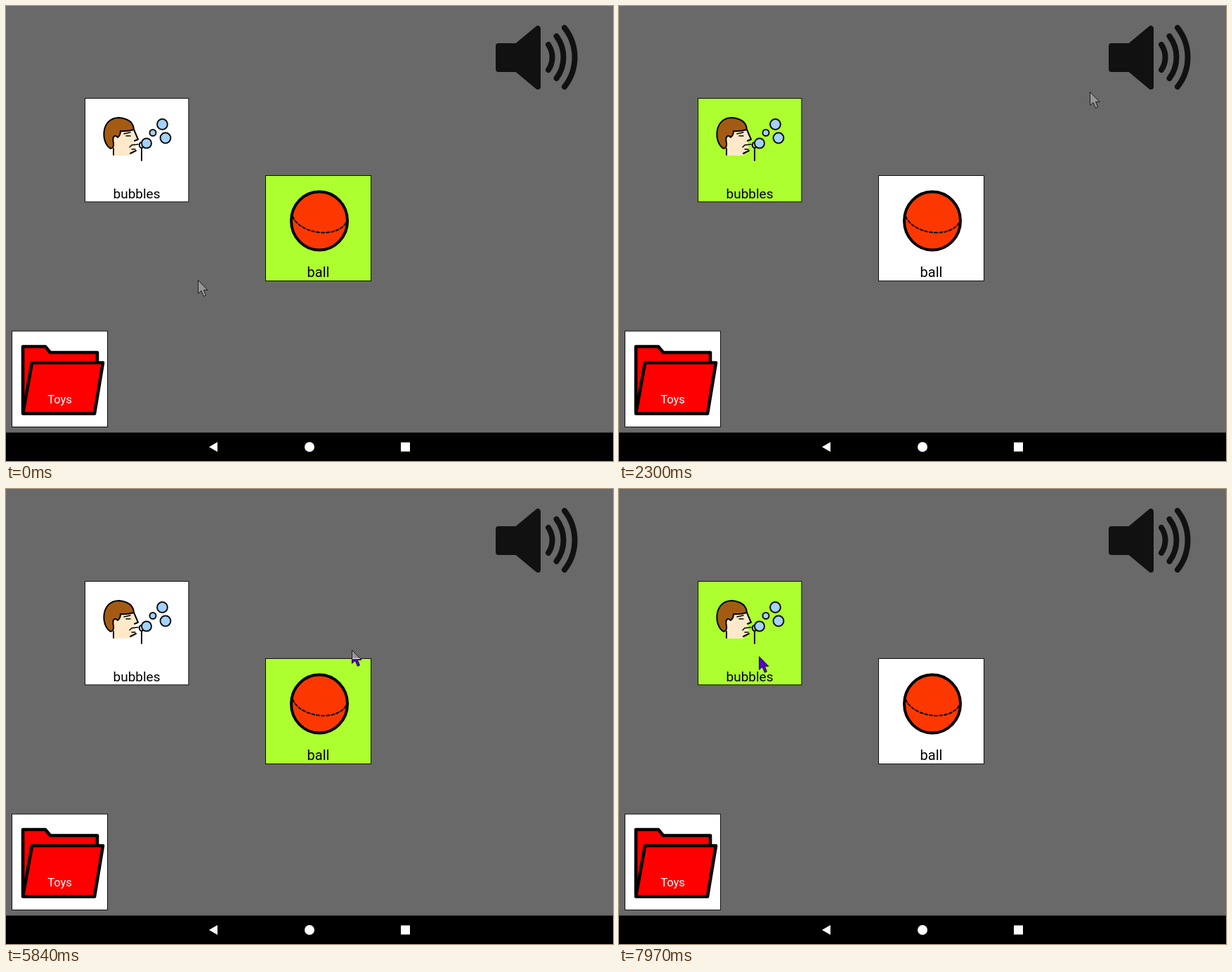
Animation of 864 by 648 pixels, one loop 8 s. Source, as an HTML page:

```html
<!DOCTYPE html>
<html lang="en">
<head>
<meta charset="utf-8">
<title>Toy board</title>
<style>
  html, body { margin: 0; width: 100%; height: 100%; overflow: hidden; background: #696969; }
  svg { display: block; width: 864px; height: 648px; }
  text { font-family: Roboto, Arial, sans-serif; text-anchor: middle; }
  .card { fill: #fff; stroke: #111; stroke-width: 1; }
  .line { fill: none; stroke: #000; stroke-width: 2; stroke-linecap: round; stroke-linejoin: round; }
  .invert { fill: #fff; mix-blend-mode: difference; }
  .edge { fill: none; stroke: #000; stroke-opacity: .75; }
</style>
</head>
<body>
<svg viewBox="0 0 864 648">
  <defs><path id="arrow" d="M.5 .5V19.5L5 15.5L8.5 23.5L11.5 22L8.5 14.5H14Z"/></defs>

  <g fill="#111" stroke="#111" stroke-width="8" stroke-linejoin="round" stroke-linecap="round">
    <path d="M701 57H727L757 32V115L727 90H701Z"/>
    <g id="waves" fill="none"></g>
  </g>

  <g id="bubbles">
    <rect class="card" x="112.5" y="131.5" width="147.4" height="147.4"/>
    <path fill="#ffe9c8" d="M153 180L182 175L188 190L183 193L185 206L177 211V213H152Z"/>
    <path class="line" d="M182 176L188 190L183 192M185 206L177 210M153 203V212"/>
    <path class="line" style="fill:#a35b14"
      d="M149 203C135 196 134 159 161 159Q181 161 182 176Q172 179 163 178Q163 184 159 187C154 182 151 187 153 195Q154 202 149 203Z"/>
    <path class="line" style="stroke-width:1.5" d="M168 182L177 180M171 185H177M176 201L179 198L188 197M179 204H184"/>
    <path class="line" d="M193 202V220"/>
    <ellipse class="line" cx="193" cy="198" rx="3.2" ry="4"/>
    <text x="186" y="273.5" font-size="19">bubbles</text>
  </g>

  <g id="ball">
    <rect class="card" x="369.5" y="241.5" width="150" height="150"/>
    <ellipse cx="446" cy="306" rx="40" ry="41.5" fill="#fc3800" stroke="#000" stroke-width="4"/>
    <path class="line" stroke-dasharray="4 3" d="M407 293A39.7 25 9 0 0 485 306"/>
    <text x="444.5" y="386" font-size="20">ball</text>
  </g>

  <rect class="card" x="8.5" y="463" width="136" height="136.5"/>
  <g class="line" style="fill:#f00;stroke-width:4.6">
    <path d="M24 578V485H56L63 493.5H130V508"/>
    <path d="M37 508H138L126 580.5H24Z"/>
  </g>
  <text x="76.5" y="566" font-size="16.5" fill="#fff">Toys</text>

  <rect y="607.5" width="864" height="40.5"/>
  <g fill="#fff">
    <path d="M289 628L301 621V635Z"/>
    <circle cx="432" cy="628" r="7"/>
    <rect x="562" y="621.5" width="13" height="13"/>
  </g>

  <use class="cursor invert" href="#arrow"/>
  <use class="cursor edge" href="#arrow"/>
</svg>
<script>
  const LOOP = 8000, STEP = 1000 / 15, GREEN = '#adff2f', WHITE = '#fff';
  const $ = s => document.querySelector(s);

  function add(parent, tag, attrs) {
    const el = document.createElementNS('http://www.w3.org/2000/svg', tag);
    for (const k in attrs) el.setAttribute(k, attrs[k]);
    parent.append(el);
  }

  for (let i = 0; i < 3; i++) {
    const x = 772 + 11.5 * i, half = 18 + 12 * i, r = 32 + 18 * i;
    add($('#waves'), 'path', { d: `M${x} ${73 - half}A${r} ${r} 0 0 1 ${x} ${73 + half}` });
  }
  for (const [cx, cy, r] of [[200, 195.5, 7], [209, 180.5, 4.5], [222.5, 168.5, 7.4], [227, 188, 7.4]])
    add($('#bubbles'), 'circle', { cx, cy, r, fill: '#a3d2fb', stroke: '#111', 'stroke-width': 2 });

  // each move starts where the last one ended
  const home = { x: 273, y: 390 };
  const moves = [
    { at: 500, steps: 10, x: 200, y: 219 },
    { at: 1900, steps: 12, x: 741, y: 74, sharp: 5.6, bend: 256 },
    { at: 3240, steps: 5, x: 634, y: 194 },
    { at: 4370, steps: 7, x: 445, y: 282 },
    { at: 5570, steps: 13, x: 723, y: 75, sharp: 3.4, bend: -128 },
    { at: 6440, steps: 2, x: 730, y: 72 },
    { at: 7040, steps: 11, x: 197, y: 226 },
    { at: 7970, steps: 1, x: 199, y: 238 }
  ];

  const ease = (u, k) => u ** k / (u ** k + (1 - u) ** k);

  function cursorAt(t) {
    let from = home, pos = home;
    for (const { at, steps, x, y, sharp = 2, bend = 0 } of moves) {
      if (t < at) break;
      const done = Math.min(steps, Math.floor((t - at + 10) / STEP) + 1);
      const e = ease(done / steps, sharp);
      pos = {
        x: from.x + (x - from.x) * e,
        y: from.y + (y - from.y) * e + bend * e * (1 - e)
      };
      from = { x, y };
    }
    return pos;
  }

  const cursors = document.querySelectorAll('.cursor');
  const within = (t, a, b) => t >= a && t < b;

  function draw(t) {
    const { x, y } = cursorAt(t);
    for (const c of cursors) c.setAttribute('transform', `translate(${Math.round(x)} ${Math.round(y)})`);
    $('#bubbles .card').style.fill = within(t, 1500, 3040) || t >= 7900 ? GREEN : WHITE;
    $('#ball .card').style.fill = t < 1500 || within(t, 5240, 6840) ? GREEN : WHITE;
  }

  let start;
  function tick(now) {
    start ??= now;
    draw((now - start) % LOOP);
    requestAnimationFrame(tick);
  }
  draw(0);
  requestAnimationFrame(tick);
</script>
</body>
</html>
```
